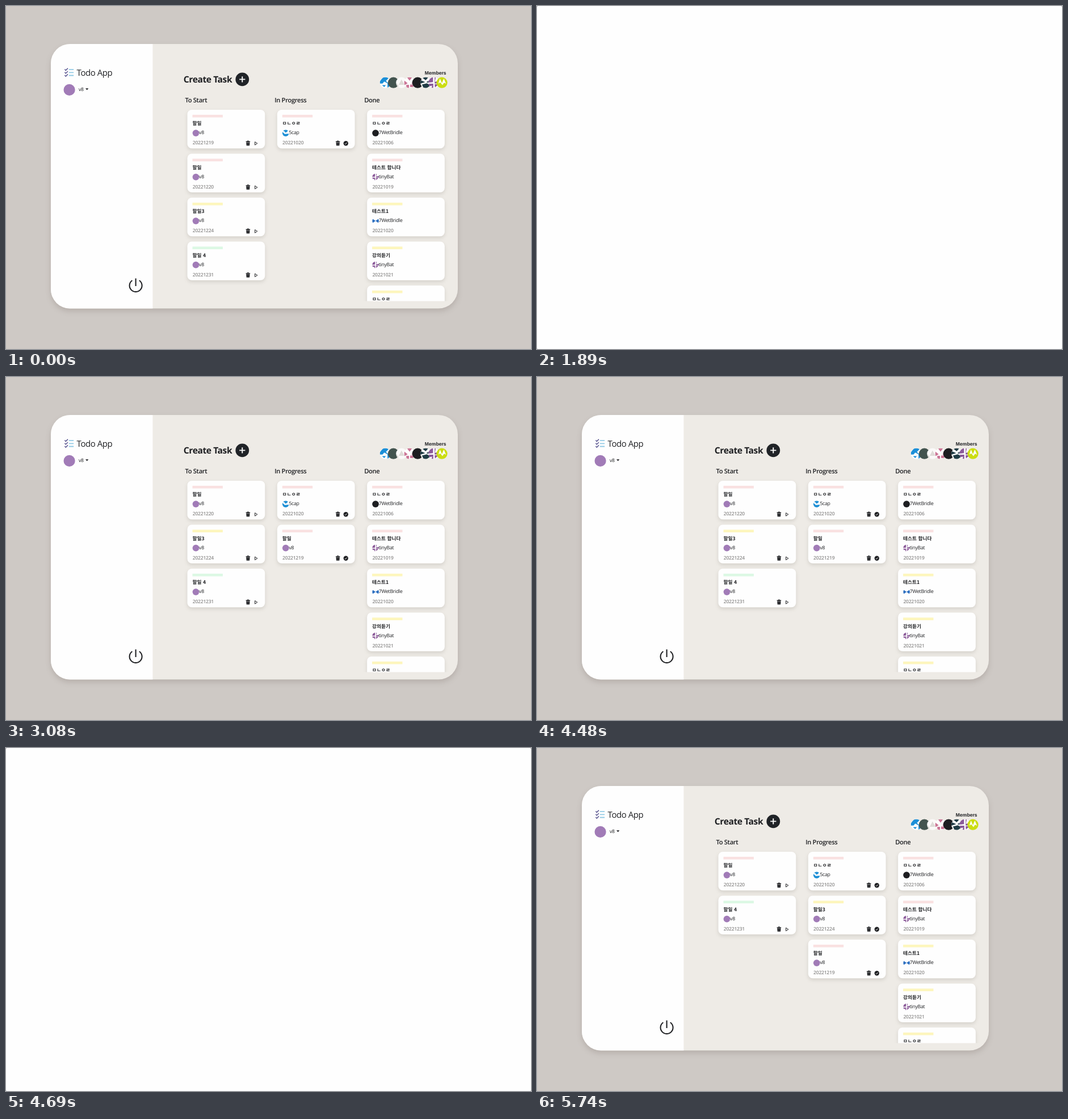
An HTML page that plays this animation: 925 by 605 pixels, repeating every 8000 ms.

```html
<!DOCTYPE html>
<html lang="ko">
<head>
<meta charset="utf-8">
<title>Todo App</title>
<style>
  html, body { margin: 0; width: 100%; height: 100%; overflow: hidden; background: #8d8a88; }
  svg { display: block; width: 925px; height: 605px; background: #fefefe; border-radius: 1.5px; }
  text { font-family: "Open Sans", "Noto Sans", sans-serif; letter-spacing: -.03em; fill: #1f2023;
         text-rendering: geometricPrecision; white-space: pre; }
  .brand { font-size: 15px; fill: #202124; }
  .create { font-size: 15.7px; font-weight: 700; }
  .head { font-size: 11.2px; font-weight: 600; }
  .members { font: 700 8.65px "Liberation Sans", Arial, sans-serif; letter-spacing: 0; }
  .user { font-size: 8.7px; }
  .title { font: 700 8.7px "Noto Sans CJK KR", "Noto Sans CJK", "Noto Sans CJK JP", sans-serif; letter-spacing: 0; }
  .date { font-size: 8.6px; font-weight: 600; fill: #8d8c8b; }
  .panel { filter: drop-shadow(0 5px 5px rgba(70, 55, 45, .17)); }
  .card { fill: #fefefe; filter: drop-shadow(0 3px 3px rgba(70, 60, 50, .15)); }
</style>
</head>
<body>
<svg id="stage" viewBox="0 0 925 605">
  <defs>
    <clipPath id="disc"><circle r="1"/></clipPath>
    <clipPath id="list"><rect x="300" y="176" width="490" height="344.5"/></clipPath>
  </defs>
  <g id="page">
    <rect width="925" height="605" fill="#cec9c5"/>
    <rect class="panel" x="79" y="67" width="717" height="466.6" rx="34" fill="#eeebe6"/>
    <path d="M258.4 67H113a34 34 0 0 0-34 34V499.6a34 34 0 0 0 34 34H258.4Z" fill="#fefefe"/>
    <g fill="none" stroke-width="1.5">
      <path stroke="#94cbe6" stroke-width="1.8" d="M110.8 112.2h8.4M110.8 117.4h8.4M110.8 122.5h8.4"/>
      <path stroke="#4a4586" stroke-width="1.3" d="M103.3 111.6l2 1.9 3.7-3.7M103.3 116.9l2 1.9 3.7-3.7M103.3 122.1l2 1.9 3.7-3.7"/>
    </g>
    <text class="brand" x="124.6" y="122.8">Todo App</text>
    <circle cx="111.6" cy="147.9" r="10.1" fill="#a17bb7"/>
    <text class="user" x="128" y="150">v8</text>
    <path d="M140 145.2h5.4l-2.7 3Z" fill="#1f2023"/>
    <path d="M222.4 484A11 11 0 1 0 234.8 484M228.6 480.6V494" fill="none" stroke="#222326" stroke-width="2.1"/>
    <text class="create" x="312.8" y="134.7">Create Task</text>
    <circle cx="416.3" cy="129.4" r="11.9" fill="#202327"/>
    <path d="M411.2 129.4h10.2M416.3 124.3v10.2" stroke="#fff" stroke-width="1.9"/>
    <text class="members" x="737.8" y="121.3">Members</text>
    <text class="head" x="315.5" y="169.8">To Start</text>
    <text class="head" x="473.2" y="169.8">In Progress</text>
    <text class="head" x="631.2" y="169.8">Done</text>
    <g id="team"></g>
    <g id="boards" clip-path="url(#list)"></g>
  </g>
</svg>
<script>
const $ = id => document.getElementById(id);

// Avatar: base colour, pattern colour, pattern in a unit disc
const PINWHEEL = 'M-1-1H-.15V-.1L-1 .0ZM.15-1H.35L.2-.15 1-.3V.15H.15ZM-1 .2H-.1V1H-.45L-.3.55-1 .7ZM.15.3L.9.3.2.9Z';
const AVATARS = {
  plum: ['#a17bb7'],
  ink: ['#1d1e21'],
  slate: ['#43544f'],
  wave: ['#fefefe', '#1e8fd5', 'M-1-.6L-.5-1H.9L.4-.4 0-.1-.5-.6ZM-1-.4L-.3.3 1 .2V.5L.4 1H-.6L-1 .4Z'],
  bow: ['#fefefe', '#2c6fc0', 'M-1-.7L0 0-1 .7ZM1-.7L0 0 1 .7Z'],
  fan: ['#fefefe', '#8b5a99', PINWHEEL],
  sky: ['#fefefe', '#1c8fd8', 'M-1-.25L-.4-1H.8L.1-.3.8.3V1H.4V.1L-.2-.2-.5.15H-1ZM-.6.45H.1L-.2.8Z'],
  mist: ['#fbfaf9', '#dedbd7', 'M0-.6L.55.4H-.5ZM-.8.1L-.5.7H-1Z'],
  rose: ['#fefefe', '#cb7696', 'M-.5-1H.5L0-.35ZM-1-.4L-.35.1-1 .5ZM1-.4L.35.1 1 .5ZM-.6.4H-.1V1H-.6ZM.1.35H.7V.8H.1Z'],
  teal: ['#fefefe', '#203c45', 'M-.8-1H.5L0-.45ZM-1-.5L-.1-.1-1 .2ZM1-.6L.1-.1 1 .2ZM-.7.35L.2.1.9.5.2 1H-.4Z'],
  lime: ['#cbdd12', '#fefefe', 'M-.65.15L-.35-.75.0 .1.35-.75.75.2.4.0.1.45-.3-.05Z']
};
const TAGS = { red: '#f9e1e1', yellow: '#fdf6bd', green: '#dcf8e4' };
const USERS = { v8: 'plum', '5cap': 'wave' };

// title, tag, user, date, avatar
const CARDS = {
  a: ['할일', 'red', 'v8', '20221219'],
  b: ['할일', 'red', 'v8', '20221220'],
  c: ['할일3', 'yellow', 'v8', '20221224'],
  d: ['할일 4', 'green', 'v8', '20221231'],
  e: ['ㅁㄴㅇㄹ', 'red', '5cap', '20221020'],
  f: ['ㅁㄴㅇㄹ', 'red', '7WetBridle', '20221006', 'ink'],
  g: ['테스트 합니다', 'red', 'tinyBat', '20221019', 'fan'],
  h: ['테스트1', 'yellow', '7WetBridle', '20221020', 'bow'],
  i: ['강의듣기', 'yellow', 'tinyBat', '20221021', 'fan'],
  j: ['ㅁㄴㅇㄹ', 'yellow', 'tinyBat', '20221022', 'fan']
};
const BOARDS = [['abcd', 'e', 'fghij'], ['bcd', 'ea', 'fghij'], ['bd', 'eca', 'fghij']];

function avatar(name, x, y, r) {
  const [base, ink, d] = AVATARS[name];
  const pattern = d ? `<path d="${d}" fill="${ink}" clip-path="url(#disc)"/>` : '';
  return `<g transform="translate(${x} ${y}) scale(${r})"><circle r="1" fill="${base}"/>${pattern}</g>`;
}

const trash = `<path d="M103.2 55.6h2.4v-.9h2.6v.9h2.4v1.4h-7.4ZM103.7 57.6h6.4l-.5 5.8h-5.4Z" fill="#1f2023"/>
  <path d="M105.8 58.6v3.6M108 58.6v3.6" stroke="#77777a" stroke-width=".5"/>`;
const play = '<path d="M119.1 56.7v5.6l4.3-2.8Z" fill="none" stroke="#1f2023" stroke-width="1" stroke-linejoin="round"/>';
const check = `<circle cx="121" cy="59.4" r="4.2" fill="#1f2023"/>
  <path d="M119.1 59.5l1.4 1.4 2.5-2.9" fill="none" stroke="#fff" stroke-width=".9"/>`;
const ACTIONS = [trash + play, trash + check, ''];

function card(key, col, row) {
  const [title, tag, user, date, face = USERS[user]] = CARDS[key];
  return `<g transform="translate(${319.5 + col * 158.3} ${182.9 + row * 77.5})">
    <rect class="card" width="136.8" height="68.4" rx="8"/>
    <rect x="9" y="9" width="53.4" height="4.6" fill="${TAGS[tag]}"/>
    <text class="title" x="9" y="27.5">${title}</text>
    ${avatar(face, 15, 41.2, 5.9)}
    <text class="user" x="20.6" y="43.4">${user}</text>
    <text class="date" x="9.3" y="61.4">${date}</text>
    ${ACTIONS[col]}</g>`;
}

$('team').innerHTML = ['sky', 'slate', 'mist', 'rose', 'ink', 'teal', 'fan', 'lime']
  .map((name, i) => avatar(name, 668.3 + i * 14.25, 135.2, 9.6)).join('');
$('boards').innerHTML = BOARDS.map(cols =>
  `<g>${cols.map((keys, c) => [...keys].map((k, r) => card(k, c, r)).join('')).join('')}</g>`).join('');

// start time, page visible, board index (-1: still loading)
const STEPS = [
  [0, true, 0], [1890, false, -1], [2380, true, -1], [3010, true, 1],
  [4690, false, -1], [5110, true, -1], [5670, true, 2]
];
const LOOP = 8000;
const boards = [...$('boards').children];
const show = (el, on) => { el.style.display = on ? '' : 'none'; };
const start = performance.now();
let shown;

function draw(now) {
  const t = Math.max(0, now - start) % LOOP;
  const step = STEPS.findLast(s => s[0] <= t);
  if (step !== shown) {
    const [, visible, board] = shown = step;
    show($('page'), visible);
    show($('team'), board >= 0);
    boards.forEach((el, i) => show(el, i === board));
  }
  requestAnimationFrame(draw);
}
draw(start);
</script>
</body>
</html>
```
